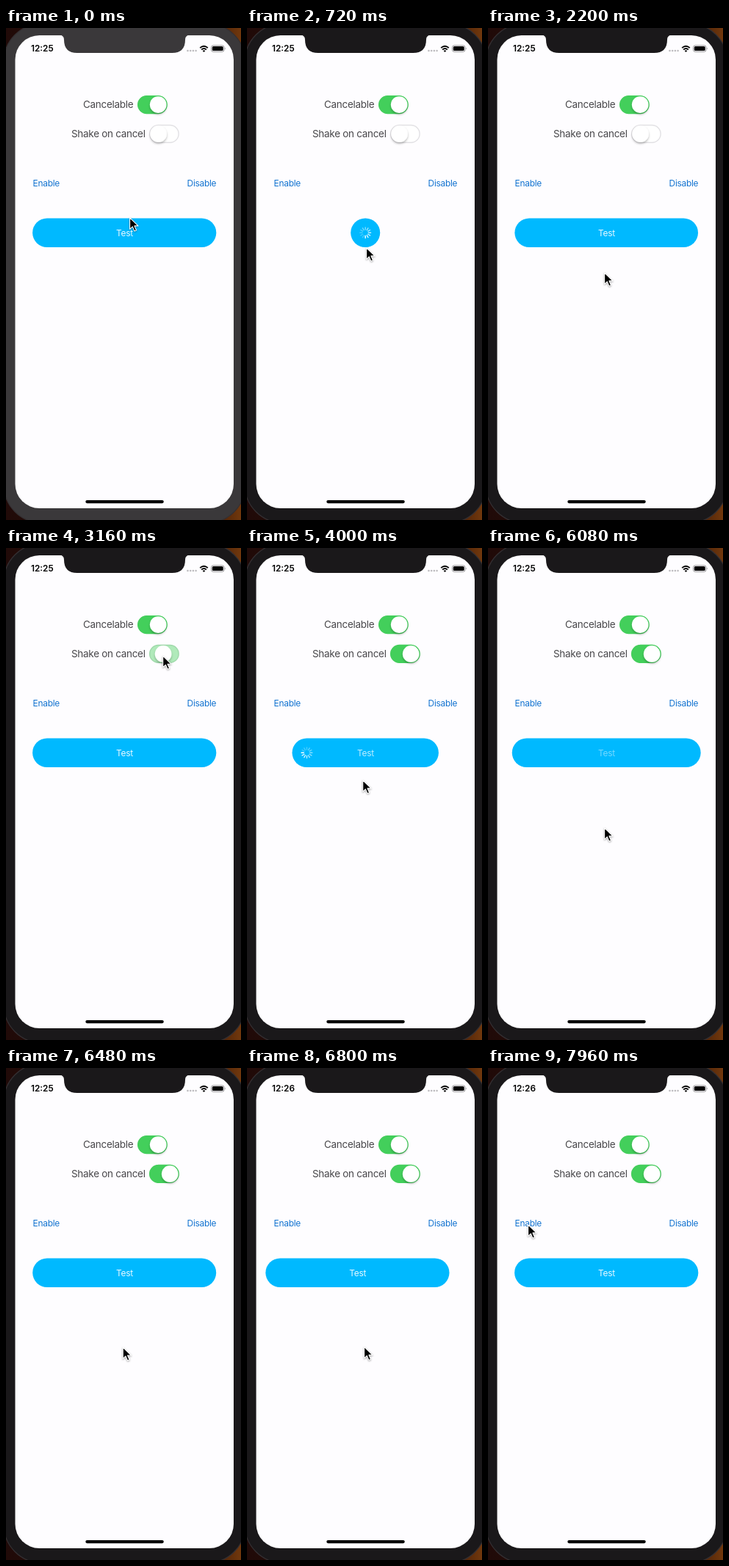
Write an HTML page that moves like this. It is 320 px wide and 671 px high and loops after 8 s.

```html
<!DOCTYPE html>
<html lang="en">
<head>
<meta charset="utf-8">
<title>Loading button</title>
<style>
  html, body { margin: 0; width: 100%; height: 100%; overflow: hidden; background: #230c06; }
  svg { display: block; width: 100vw; height: 100vh; }
  text { font-family: Inter, Roboto, sans-serif; letter-spacing: -0.022em; }
  .label { font-size: 13.5px; fill: #48474a; }
  .link { font-size: 11.9px; fill: #1273d0; }
  .clock { font-size: 11.8px; font-weight: 600; letter-spacing: 0; }
</style>
</head>
<body>
<svg viewBox="0 0 320 671">
  <defs>
    <linearGradient id="desk">
      <stop offset="0" stop-color="#200a08"/>
      <stop offset=".85" stop-color="#351405"/>
      <stop offset="1" stop-color="#71380d"/>
    </linearGradient>
    <filter id="soft" x="-50%" y="-50%" width="200%" height="200%">
      <feDropShadow dx="0" dy="2" stdDeviation="1.5" flood-opacity=".28"/>
    </filter>
  </defs>

  <rect width="320" height="671" fill="url(#desk)"/>
  <rect id="bezel" x="-3" y="-6" width="329" height="681" rx="52" stroke="#343033" stroke-width="1.2"/>
  <rect x="12.5" y="10" width="297.5" height="645" rx="33" fill="#fefdff"/>
  <path id="notch" d="M73 9.5Q79 10 79 16Q79 34 97 34H226Q244 34 244 16Q244 10 250 9.5Z"/>

  <text id="clock" class="clock" x="34" y="32.3"></text>
  <g fill="#bdbcbf">
    <circle cx="247.5" cy="31" r="1.3"/><circle cx="251.2" cy="31" r="1.3"/>
    <circle cx="254.9" cy="31" r="1.3"/><circle cx="258.6" cy="31" r="1.3"/>
  </g>
  <g fill="none" stroke="#000" stroke-width="1.8">
    <path d="M264.2 27.2Q269.5 22.4 274.8 27.2"/>
    <path d="M266.2 29.5Q269.5 26.6 272.8 29.5"/>
  </g>
  <path d="M267.7 31Q269.5 29.6 271.3 31L269.5 32.9Z"/>
  <rect x="279.5" y="23.8" width="17.5" height="8.6" rx="2.6" fill="none" stroke="#8b8a8d" stroke-width=".9"/>
  <rect x="280.8" y="25.1" width="14.9" height="6" rx="1.5"/>
  <path d="M298 26.6Q299.6 28.1 298 29.6Z" fill="#8b8a8d"/>

  <text class="label" x="105" y="109.2">Cancelable</text>
  <text class="label" x="89" y="149.2">Shake on cancel</text>
  <g id="cancelable"></g>
  <g id="shake"></g>
  <text class="link" x="36.6" y="215.8">Enable</text>
  <text class="link" x="286.3" y="215.8" text-anchor="end">Disable</text>

  <rect id="button" y="259.4" height="39.6" rx="19.8" fill="#00b9ff"/>
  <text id="title" y="283.6" font-size="11.9" fill="#fff" text-anchor="middle">Test</text>
  <g id="spinner" stroke="#fff" stroke-width="1.35" stroke-linecap="round"></g>

  <rect x="108.3" y="644" width="106.5" height="4.2" rx="2.1"/>
  <path id="cursor" d="M.6 .8V16.3L4.3 12.9L6.9 18.9L9.5 17.8L6.9 11.9H12Z"
        stroke="#fff" stroke-width="1.1" stroke-linejoin="round"
        style="filter: drop-shadow(0 1px 1px rgba(0,0,0,.35))"/>
</svg>
<script>
const LOOP = 8000, CENTER = 161.2, FULL = 125.1, SMALL = 20;
const FOCUS_AT = 220, MINUTE_AT = 6500, SWITCH_AT = 3050;
const LOADS = [{ start: 320, cancel: 1680 }, { start: 3905, cancel: 5865 }];
const SHAKE = { start: 6690, length: 480, period: 160, size: 11.5 };
const POINTER = [ // time, x, y
  [0, 168, 258], [220, 166, 272], [340, 166, 274], [700, 162, 299],
  [1450, 162, 299], [1620, 162, 291], [1700, 162, 291], [2000, 158, 333],
  [2300, 158, 333], [2900, 214, 144], [3120, 214, 144], [3650, 161, 286],
  [3860, 160, 290], [4020, 157, 317], [4240, 157, 323], [5200, 157, 321],
  [5640, 161, 289], [5830, 161, 291], [6060, 158, 381], [6800, 159, 379.5],
  [7350, 159, 379], [7900, 54, 213], [8000, 54, 213]
];

const $ = id => document.getElementById(id);
const set = (el, attrs) => { for (const k in attrs) el.setAttribute(k, attrs[k]); };
const add = (parent, tag, attrs) => {
  const el = document.createElementNS("http://www.w3.org/2000/svg", tag);
  set(el, attrs);
  return parent.appendChild(el);
};
const clamp = v => Math.min(1, Math.max(0, v));
const mix = (a, b, p) => a + (b - a) * p;
const smooth = p => { p = clamp(p); return p * p * (3 - 2 * p); };

// Underdamped spring whose overshoot peaks after 260 ms.
function spring(ms) {
  const w = Math.PI / 260, decay = w * 0.95;
  return 1 - Math.exp(-decay * ms) * (Math.cos(w * ms) + decay / w * Math.sin(w * ms));
}

function makeSwitch(group, x, y) {
  const box = { x: x + .7, y: y + .7, width: 39.4, height: 23.8, rx: 11.9 };
  add(group, "rect", { ...box, fill: "#fff", stroke: "#e2e1e4", "stroke-width": 1.4 });
  const track = add(group, "rect", { ...box, fill: "#43cf5b", stroke: "#43cf5b", "stroke-width": 1.4 });
  const knob = add(group, "circle", { cy: y + 12.6, r: 11.3, fill: "#fff", filter: "url(#soft)" });
  return p => {
    set(track, { opacity: p });
    set(knob, { cx: mix(x + 12.6, x + 28.2, p) });
  };
}

const setCancelable = makeSwitch($("cancelable"), 179, 92);
const setShake = makeSwitch($("shake"), 195, 131.8);
setCancelable(1);

const spokes = Array.from({ length: 12 }, (_, i) =>
  add($("spinner"), "line", { y1: -4.1, y2: -7.4, transform: `rotate(${i * 30})` }));

function drawButton(t) {
  let half = FULL, alpha = 1, loading = false;
  for (const { start, cancel } of LOADS) {
    if (t >= cancel) {
      half = mix(SMALL, FULL, spring(t - cancel));
      alpha = clamp((t - cancel) / 430);
    } else if (t >= start) {
      half = mix(FULL, SMALL, smooth((t - start) / 300));
      alpha = 1 - clamp((t - start) / 300) ** 1.5;
      loading = true;
    }
  }
  const s = t - SHAKE.start;
  const shift = s > 0 && s < SHAKE.length ? SHAKE.size * Math.sin(2 * Math.PI * s / SHAKE.period) : 0;
  const x = CENTER + shift;
  set($("button"), { x: x - half, width: half * 2 });
  set($("title"), { x: x + .3, opacity: alpha * .92 });
  set($("spinner"), {
    visibility: loading ? "visible" : "hidden",
    transform: `translate(${x - half + SMALL} 279.2)`
  });
  const head = Math.floor((t / 1000 - .22) * 12);
  spokes.forEach((spoke, i) => {
    const age = ((head - i) % 12 + 12) % 12;
    set(spoke, { opacity: Math.max(.28, 1 - age * .08) });
  });
}

function drawPointer(t) {
  const i = POINTER.findIndex(p => p[0] > t);
  const [t0, x0, y0] = POINTER[i - 1], [t1, x1, y1] = POINTER[i];
  const p = smooth((t - t0) / (t1 - t0));
  set($("cursor"), { transform: `translate(${mix(x0, x1, p)} ${mix(y0, y1, p)})` });
}

function draw(t) {
  const shell = t < FOCUS_AT ? "#3a383a" : "#1a181a";
  set($("bezel"), { fill: shell });
  set($("notch"), { fill: shell });
  $("clock").textContent = t < MINUTE_AT ? "12:25" : "12:26";
  setShake(smooth((t - SWITCH_AT) / 250));
  drawButton(t);
  drawPointer(t);
}

const began = performance.now();
function tick() {
  draw((performance.now() - began) % LOOP);
  requestAnimationFrame(tick);
}
tick();
</script>
</body>
</html>
```
